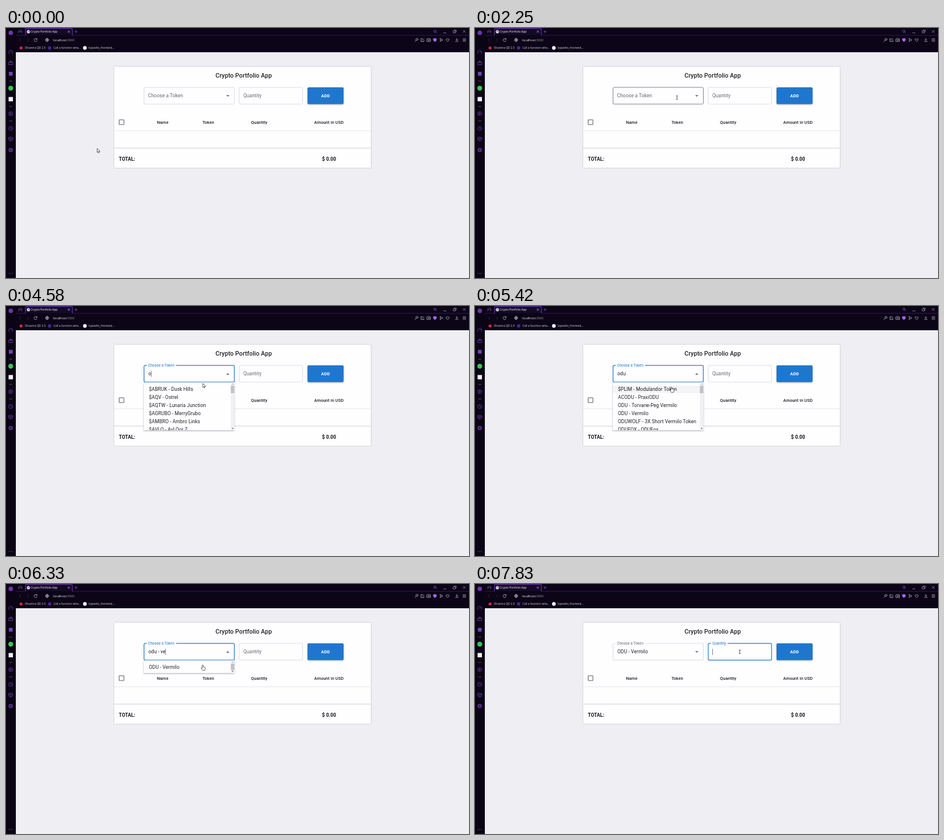
Write an HTML page that moves like this. It is 800x433 px and loops after 8 s.

```html
<!DOCTYPE html>
<html lang="en">
<head>
<meta charset="utf-8">
<title>Crypto Portfolio App</title>
<style>
  html, body { margin: 0; width: 100%; height: 100%; overflow: hidden; background: #efeef3; }
  svg { display: block; width: 100%; height: 100%; }
  text { font: 8.4px Roboto, Arial, sans-serif; letter-spacing: .075px; fill: #212121; white-space: pre; }
  .mid { text-anchor: middle; }
  .title { font-size: 10.5px; font-weight: 500; }
  .head { font-size: 7.4px; font-weight: 500; }
  .bold { font-weight: 700; fill: #111; }
  .add { font-size: 7.4px; font-weight: 600; letter-spacing: .2px; fill: #fff; }
  .ui { font-family: "Open Sans", "Noto Sans", sans-serif; font-size: 4.85px; letter-spacing: 0; fill: #d9d5e0; }
  .icon { fill: none; stroke: #b9b2c6; stroke-width: .8; stroke-linecap: round; stroke-linejoin: round; }
  .dim { stroke: #39324a; }
  .side { stroke: #7340b4; }
  .card { filter: drop-shadow(0 .8px .9px rgba(0, 0, 0, .26)); }
  .raised { filter: drop-shadow(0 1px 1.2px rgba(0, 0, 0, .35)); }
  .popup { filter: drop-shadow(0 1px 1px rgba(0, 0, 0, .35)); }
  .box { fill: none; stroke: #c6c5c8; stroke-width: .6; }
  .box.hover { stroke: #333; }
  .box.focus { stroke: #1f77cd; stroke-width: 1.2; }
  .label { fill: #696969; }
  .label.focus { fill: #1f77cd; }
  .caret { stroke: #333; stroke-width: .6; }
  .pointer { fill: #fff; stroke: #222; stroke-width: .7; stroke-linejoin: round; }
</style>
</head>
<body>
<svg viewBox="0 0 800 433">
  <defs>
    <clipPath id="listClip"><rect id="clipRect" x="238" y="132" width="150.5" height="83.5"/></clipPath>
  </defs>
  <rect width="800" height="433" fill="#efeef3"/>

  <!-- browser frame -->
  <rect width="800" height="42" fill="#0b0517"/>
  <rect width="17" height="433" fill="#0a0414"/>
  <path d="M17 12.7H33.5V2.5Q33.5 .8 35 .8H113Q114.7 .8 114.7 2.5V12.7H800" fill="none" stroke="#45207a" stroke-width=".7"/>
  <path d="M33.5 12.5V2.5Q33.5 .8 35 .8H113Q114.7 .8 114.7 2.5V12.5" fill="#130a26" stroke="#8236d0" stroke-width=".9"/>
  <circle cx="38.8" cy="6.3" r="2.9" fill="#e8e6ee"/>
  <path d="M37 5l1.5 .8-.6 1.6M39.6 4l1.2 1.5-.7 2" fill="none" stroke="#1a1030" stroke-width=".7"/>
  <text class="ui" x="43" y="8.2" style="fill:#fff">Crypto Portfolio App</text>
  <text class="ui" x="81.3" y="22.7" style="font-size:5.5px;fill:#f0edf5">localhost:<tspan fill="#9d96aa">3000</tspan></text>
  <text class="ui" x="32.5" y="36.4">Olvantra QD 2.5</text>
  <text class="ui" x="82" y="36.4">Call a function whe...</text>
  <text class="ui" x="142.5" y="36.4">lojavelto_frontend...</text>
  <circle cx="26" cy="34.5" r="2.6" fill="#d8283c"/>
  <circle cx="75.3" cy="34.5" r="2.9" fill="#4a2596"/>
  <circle cx="136.3" cy="34.5" r="3.2" fill="#f4f2f7"/>

  <g class="icon">
    <path d="M22 8.5V5.5Q22 4 23.5 4H26Q27.5 4 27.5 5.5V8.5M22 6.5H27.5" stroke="#71509f"/>
    <path d="M107 4.7l3.2 3.2M110.200 4.700l-3.200 3.200"/>
    <path d="M119 6.300h4M121 4.300v4" stroke="#8650ca"/>
    <path class="dim" d="M25.500 18.500L23 21l2.500 2.500M37 18.500L39.500 21L37 23.500"/>
    <path d="M53.300 19.300A2.700 2.700 0 1 0 53.700 21.700M53.700 18v1.800h-1.800"/>
    <circle cx="71" cy="20.700" r="2.700"/><path d="M68.300 20.700h5.400M71 18q-2 2.700 0 5.400q2-2.700 0-5.400"/>
    <circle cx="741" cy="5.500" r="2" stroke="#8650ca"/><path d="M742.600 7l1.500 1.500" stroke="#8650ca"/>
    <path d="M756 8.500h4.500M773 5h3.500v3.500H773zM774.500 5V3.500H778V7h-1.500M789.700 4l4 4M793.700 4l-4 4" stroke="#9a90aa"/>
    <circle cx="710" cy="19.700" r="1.800"/><path d="M708.700 21l-2.200 2.500"/>
    <path d="M719.500 18.500H717V23.500H722V21M719 21.500l3-3"/>
    <path d="M727.500 19h1.300l.7-1h2l.7 1h1.300V23.300H727.500z"/><circle cx="730.500" cy="21" r="1"/>
    <path d="M738.500 18.700l2.600-.8 2.600 .8v2q-.4 2-2.600 3q-2.200-1-2.600-3z" fill="#a667ee" stroke="#a667ee"/>
    <path d="M750 18.200l5 2.600-5 2.600 .8-2.600z"/>
    <path d="M763 23.400l-2.500-2.500q-.7-2 1-2.300 1 0 1.500 1 .5-1 1.500-1 1.700 .3 1 2.300z"/>
    <path d="M779 18v3.500M777.500 20l1.500 1.500 1.500-1.500M776.500 23.300h5M789.500 18.700h5M789.500 20.800h5M789.500 22.900h5"/>
  </g>

  <circle cx="8.300" cy="8.300" r="3.900" fill="#6c35ab"/>
  <rect x="5" y="76" width="6.500" height="6.500" fill="#7340b4"/>
  <circle cx="8.200" cy="104.300" r="4.200" fill="#35c759"/>
  <rect x="4.500" y="119.500" width="7.500" height="7.500" fill="#f2f0f5"/>
  <g class="icon side">
    <path d="M5.700 44.500A3.500 3.500 0 1 1 10.700 44.500M8.200 42l1.600-1.600"/>
    <path d="M5 59.500h6.500V63.500H5zM6.500 59.500v-1.500h3.500v1.500M8.200 58V56.500"/>
    <path d="M6 92h4.500M6 135.800h4.500M6 161h4.500" stroke="#75677f"/>
    <circle cx="8.200" cy="148.300" r="3.500"/><path d="M7.300 146.700l2.500 1.600-2.500 1.600z"/>
    <circle cx="8.200" cy="174" r="3.500"/><path d="M8.200 172v2.200l1.400 .8"/>
    <path d="M8.200 188.700l3.400 1.700v3.600l-3.400 1.700-3.400-1.700v-3.600zM4.800 190.400l3.400 1.700 3.400-1.700M8.200 192.100v3.600"/>
    <circle cx="8.200" cy="211.300" r="3" stroke-width="1.300" stroke-dasharray="1.900 .45"/><circle cx="8.200" cy="211.300" r="1.200"/>
    <path d="M5.500 425h.1M8.200 425h.1M10.900 425h.1" stroke-width="1.100" stroke="#9a90aa"/>
  </g>

  <!-- page -->
  <rect class="card" x="187" y="67" width="443.500" height="175" rx="2" fill="#fefdff"/>
  <text class="title mid" x="410.700" y="86">Crypto Portfolio App</text>
  <path d="M187 178H630.500" stroke="#e0dfe2" stroke-width=".8"/>
  <path d="M187 208H630.500" stroke="#c9c8cb" stroke-width=".9"/>
  <rect x="195.500" y="159" width="8.300" height="8.300" rx=".8" fill="none" stroke="#5f5f5f" stroke-width="1.050"/>
  <g class="heads">
    <text class="head mid" x="270.700" y="165.700">Name</text>
    <text class="head mid" x="349.600" y="165.700">Token</text>
    <text class="head mid" x="437.500" y="165.700">Quantity</text>
    <text class="head mid" x="558" y="165.700">Amount in USD</text>
  </g>
  <text class="bold" x="195" y="230.300">TOTAL:</text>
  <text class="bold mid" x="558.200" y="230.300">$ 0.00</text>
  <rect class="raised" x="521" y="102.800" width="62.300" height="29" rx="2" fill="#1f77cd"/>
  <text class="add mid" x="552.200" y="120.100">ADD</text>

  <g id="token">
    <rect class="box" x="238.500" y="102.800" width="156" height="29" rx="2"/>
    <rect class="notch" x="243" y="101" width="51" height="3.500" fill="#fefdff"/>
    <text class="label">Choose a Token</text>
  </g>
  <g id="quantity">
    <rect class="box" x="403" y="102.800" width="109.500" height="29" rx="2"/>
    <rect class="notch" x="407.500" y="101" width="29" height="3.500" fill="#fefdff"/>
    <text class="label">Quantity</text>
  </g>
  <path id="chevron" d="M-2.700 -1.350H2.700L0 1.350z" fill="#666"/>
  <text id="typed" x="246" y="120.300"></text>
  <path id="caret" class="caret" d="M0 112V123"/>

  <g id="popup">
    <rect id="sheet" class="popup" x="238" y="132.300" width="156.500" fill="#fefdff"/>
    <g clip-path="url(#listClip)">
      <rect id="rowHover" x="238" y="138" width="150.500" height="12.700" fill="#f4f3f5"/>
      <g id="rows"></g>
    </g>
    <rect id="track" x="388.500" y="132.300" width="6" fill="#f1f0f2"/>
    <rect id="thumb" x="388.500" y="138" width="6" fill="#c2c1c3"/>
    <path d="M389.900 136l1.600-1.800 1.600 1.800z" fill="#a5a5a5"/>
    <path id="scrollDown" d="M-1.700 -.9H1.700L0 1z" fill="#555"/>
  </g>

  <g id="cursor">
    <path id="arrow" class="pointer" d="M0 0V7L1.600 5.500L2.700 8L3.800 7.500L2.800 5.100H4.900z"/>
    <path id="beam" d="M-1.500 -3.300Q0 -3.300 0 -2.400Q0 -3.300 1.500 -3.300M0 -2.600V2.700M-1.500 3.300Q0 3.300 0 2.400Q0 3.300 1.500 3.300" fill="none" stroke="#222" stroke-width=".75"/>
    <path id="hand" class="pointer" d="M-.9 5.400V.7Q0 -.5 .8 .7V3.700Q1.600 3 2.100 4Q2.900 3.400 3.300 4.500Q4.200 4.100 4.300 5.200V7Q4 8.500 3.400 9.700H-.2Q-1.700 7.700 -2.700 5.600Q-2.200 4.500 -.9 6z"/>
  </g>
</svg>
<script>
const LOOP = 8000, FPS = 12, ROW = 14.05;
const $ = id => document.getElementById(id);

const tokens = [
  '$ABRUK - Dusk Hills', '$AQV - Ostrel', '$AQTW - Lunaria Junction',
  '$AGRUBO - MerryGrubo', '$AMBRO - Ambro Links', '$AVLQ - AvLQor Z',
  '$PLIM - Modulandor Token', 'ACODU - PraxiODU', 'ODU - Torvane-Peg Vermilo',
  'ODU - Vermilo', 'ODUWOLF - 3X Short Vermilo Token', 'ODUFOX - ODUFox',
  'PRODU - Prodelin', 'SKODU - Vantodu', 'TODU - Tolbrin'
];

// Each track is a list of [start, value] pairs held until the next one.
const typing = [[0, ''], [4580, 'o'], [4750, 'od'], [4830, 'odu'], [5670, 'odu '],
  [5920, 'odu -'], [6170, 'odu - v'], [6330, 'odu - ve'], [6580, 'ODU - Vermilo']];
const query = [[0, ''], [4920, 'odu'], [5750, 'odu '], [6000, 'odu -'], [6170, 'odu - v'], [6330, 'odu - ve']];
const pointer = [[0, 'arrow'], [2080, 'beam'], [2750, 'arrow'], [5170, 'hand'], [6660, 'arrow'], [7330, 'beam']];
const tokenState = [[0, ''], [2080, 'hover'], [2500, 'focus'], [7500, '']];
const quantityState = [[0, ''], [7330, 'hover'], [7500, 'focus']];
const caretX = [[0, null], [2580, 246], [3250, null], [3830, 246], [4330, null],
  [4580, 'end'], [5420, null], [5670, 'end'], [7080, null], [7580, 410.5]];

const path = [[80, 157.5, 208.5], [750, 590, 278], [840, 590, 278], [1080, 617.5, 293],
  [1170, 617.5, 293], [1420, 608, 297], [2000, 372, 140], [2250, 349, 120.5],
  [2580, 349, 120.5], [2830, 342, 133], [3080, 340, 134], [5090, 340, 134],
  [5420, 339.5, 140], [6580, 340, 140], [6900, 382, 166], [7250, 440, 144], [7420, 457.5, 117.5]];

const at = (track, t) => track.findLast(([start]) => t >= start)[1];
const show = (el, on) => el.setAttribute('visibility', on ? 'inherit' : 'hidden');
const move = (el, x, y, s = 1) => el.setAttribute('transform', `translate(${x} ${y}) scale(${s})`);

function along(t) {
  const i = path.findIndex(p => p[0] > t);
  if (i < 0) return path.at(-1).slice(1);
  if (i === 0) return path[0].slice(1);
  const [a, b] = [path[i - 1], path[i]];
  const k = (t - a[0]) / (b[0] - a[0]);
  return [a[1] + (b[1] - a[1]) * k, a[2] + (b[2] - a[2]) * k];
}

function drawField(id, state, x, focusAt, t) {
  const [box, notch, label] = $(id).children;
  const k = Math.min(1, Math.max(0, (t - focusAt) / 200));
  const lift = 1 - (1 - k) ** 3;
  box.setAttribute('class', 'box ' + state);
  label.setAttribute('class', 'label ' + state);
  show(notch, k > 0);
  move(label, x, 120.2 - 15.2 * lift, 1 - .25 * lift);
}

const rows = Array.from({ length: 6 }, (_, i) => {
  const row = document.createElementNS('http://www.w3.org/2000/svg', 'text');
  row.setAttribute('x', 247);
  row.setAttribute('y', 147 + i * ROW);
  return $('rows').appendChild(row);
});

function drawPopup(t) {
  const open = t >= 2660 && t < 6580;
  show($('popup'), open);
  move($('chevron'), 383.2, 117.6, open ? '1 -1' : 1);
  if (!open) return;
  const found = tokens.filter(name => name.toLowerCase().includes(at(query, t)));
  const height = Math.min(83, 8 + found.length * ROW);
  rows.forEach((row, i) => { row.textContent = found[i] || ''; });
  for (const id of ['sheet', 'track', 'clipRect']) $(id).setAttribute('height', height);
  $('thumb').setAttribute('height', Math.min(13, height - 11));
  move($('scrollDown'), 391.5, 132.3 + height - 3);
  show($('rowHover'), t >= 5170 && t < 5670);
}

function draw(time) {
  const t = Math.floor((time % LOOP + 4) * FPS / 1000) * 1000 / FPS + 5;
  drawField('token', at(tokenState, t), 245.4, 2500, t);
  drawField('quantity', at(quantityState, t), 410, 7500, t);
  drawPopup(t);

  const typed = $('typed'), caret = at(caretX, t);
  typed.textContent = at(typing, t);
  show($('caret'), caret !== null);
  if (caret !== null) move($('caret'), caret === 'end' ? 246.2 + typed.getComputedTextLength() : caret, 0);

  const kind = at(pointer, t);
  for (const id of ['arrow', 'beam', 'hand']) show($(id), id === kind);
  move($('cursor'), ...along(t));
}

const start = performance.now();
function tick() {
  draw(performance.now() - start);
  requestAnimationFrame(tick);
}
tick();
</script>
</body>
</html>
```
